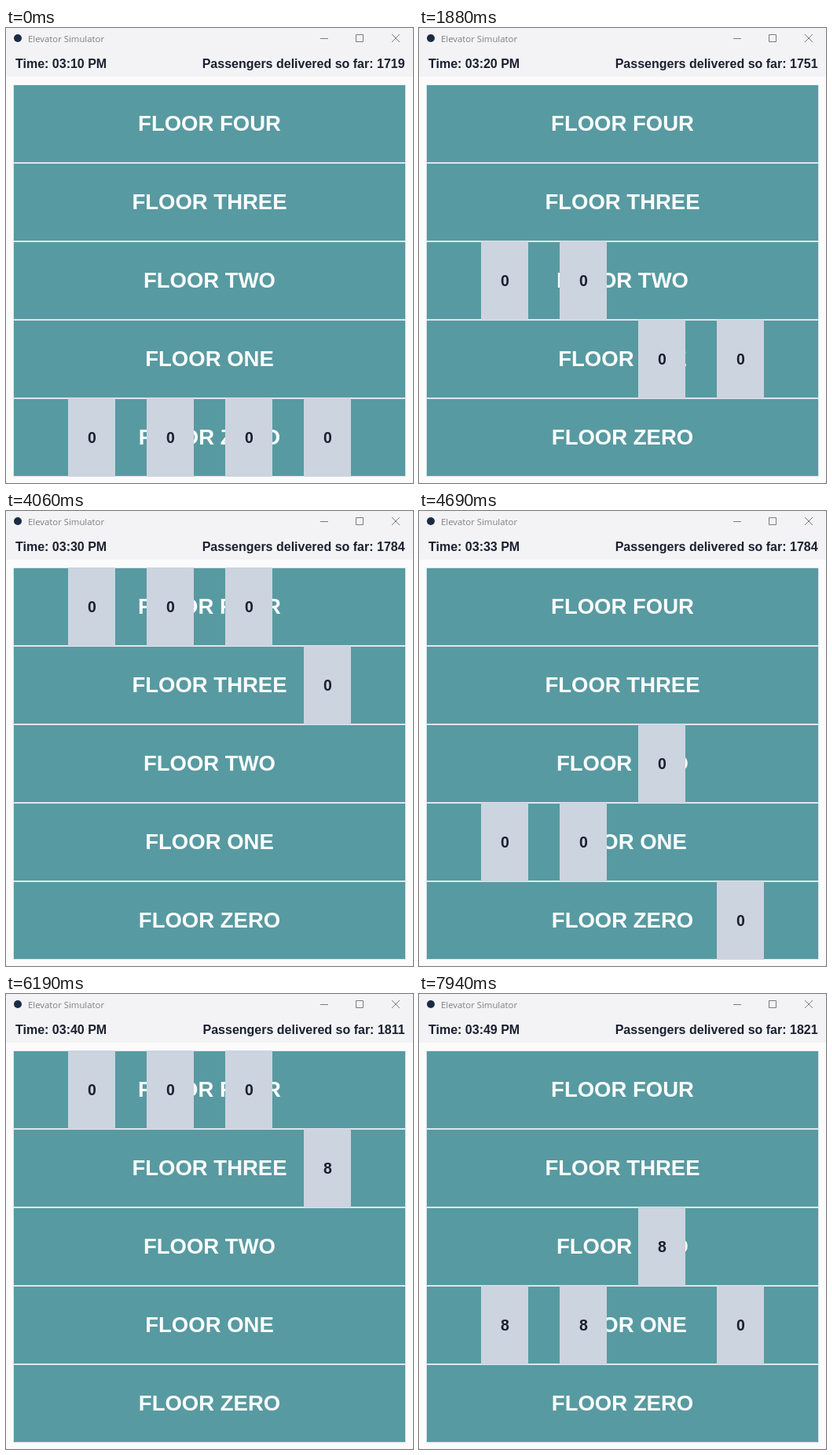
These frames come from a looping animation (518 by 580 pixels, 8 s). An HTML page:

```html
<!DOCTYPE html>
<html lang="en">
<head>
<meta charset="utf-8">
<title>Elevator Simulator</title>
<style>
  html, body { margin: 0; width: 100%; height: 100%; overflow: hidden; background: #a9aaad; }
  svg { display: block; width: 100vw; height: 100vh; }
  text { font-family: "Liberation Sans", Arial, sans-serif; font-weight: 700; fill: #1a2030; }
  .caption { font: 400 11.35px "Open Sans", "Noto Sans", sans-serif; fill: #808083; }
  .status { font-size: 16px; }
  .floor { font-size: 27.5px; fill: #fafcfc; text-anchor: middle; }
  .riders { font-size: 19.5px; text-anchor: middle; }
</style>
</head>
<body>
<svg id="stage" viewBox="0 0 518 580">
  <rect width="518" height="580" rx="1.5" fill="#fbfbfc"/>
  <rect width="518" height="62" rx="1.5" fill="#f3f3f5"/>
  <circle cx="15" cy="13" r="5" fill="#1c2b45"/>
  <text class="caption" x="28" y="18">Elevator Simulator</text>
  <path d="M400 13.5h10M445.5 8.5h9v9h-9zM491 8l10 10M501 8l-10 10" fill="none" stroke="#7b7b7d"/>
  <text id="clock" class="status" x="12" y="51"></text>
  <text id="count" class="status" x="507.6" y="51" text-anchor="end"></text>
</svg>
<script>
const LOOP = 8000;
const FLOORS = ["ZERO", "ONE", "TWO", "THREE", "FOUR"];
const TOP = FLOORS.length - 1;
const START_MINUTE = 10, START_COUNT = 1719;

// [milliseconds, simulated minutes since 03:10]
const PACE = [[0, 0.9], [1880, 10.3], [3130, 15.5], [4060, 20.5], [7130, 34.8], [8000, 39.4]];

const stage = document.getElementById("stage");
const clock = document.getElementById("clock");
const count = document.getElementById("count");

function add(parent, tag, attrs, content = "") {
  const el = document.createElementNS("http://www.w3.org/2000/svg", tag);
  for (const key in attrs) el.setAttribute(key, attrs[key]);
  el.textContent = content;
  return parent.appendChild(el);
}

const floorTop = floor => 472 - 100 * floor;

FLOORS.forEach((name, i) => {
  const y = floorTop(i);
  add(stage, "rect", { x: 9, y, width: 500, height: 100, fill: "#dfe5ec" });
  add(stage, "rect", { x: 10, y: y + 1, width: 498, height: 98, fill: "#589aa1" });
  add(stage, "text", { class: "floor", x: 259, y: y + 59 }, "FLOOR " + name);
});

// A trip leaves floor zero at minute `go`: `low` riders get off at floor one, `high` at the top.
const trip = (go, low = 0, high = 8) => ({ go, low, high });
const shuttle = Array.from({ length: 4 }, (_, n) => trip(12 * n + 2.15));
const express = [1.4, 15, 25.8, 37.9].map(go => trip(go));
const local = [trip(1.4), trip(13.55, 3, 6), trip(25, 3, 0), trip(27.6), trip(38, 2, 0)];

const cars = [shuttle, shuttle, express, local].map((trips, i) => {
  const group = add(stage, "g", {});
  add(group, "rect", { x: 79 + 100 * i, y: 0, width: 60, height: 100, fill: "#ccd4df" });
  const label = add(group, "text", { class: "riders", x: 109.4 + 100 * i, y: 57 });
  return { trips, group, label };
});

function carState(trips, m) {
  let floor = 0, riders = 0, delivered = 0;
  for (const { go, low, high } of trips) {
    const age = m - go;
    if (age < -0.4) break; // boarding starts shortly before departure
    const top = high ? TOP : 1;
    const home = high ? 9.8 : 2;
    const up = Math.min(top, Math.floor(age) + 1);
    const down = Math.ceil(home - age);
    floor = Math.max(0, Math.min(up, down));
    const left = (age >= 0.5 ? low : 0) + (age >= TOP ? high : 0);
    riders = low + high - left;
    delivered += left;
  }
  return { floor, riders, delivered };
}

function minutesAt(t) {
  const i = PACE.findIndex(p => p[0] > t);
  const [t0, m0] = PACE[i - 1], [t1, m1] = PACE[i];
  return m0 + (m1 - m0) * (t - t0) / (t1 - t0);
}

function render(t) {
  const m = minutesAt(t);
  let total = START_COUNT;
  for (const { trips, group, label } of cars) {
    const { floor, riders, delivered } = carState(trips, m);
    group.setAttribute("transform", `translate(0 ${floorTop(floor)})`);
    label.textContent = riders;
    total += delivered;
  }
  clock.textContent = `Time: 03:${START_MINUTE + Math.floor(m)} PM`;
  count.textContent = `Passengers delivered so far: ${total}`;
}

const begin = performance.now();
function tick() {
  render((performance.now() - begin) % LOOP);
  requestAnimationFrame(tick);
}
render(0);
requestAnimationFrame(tick);
</script>
</body>
</html>
```
